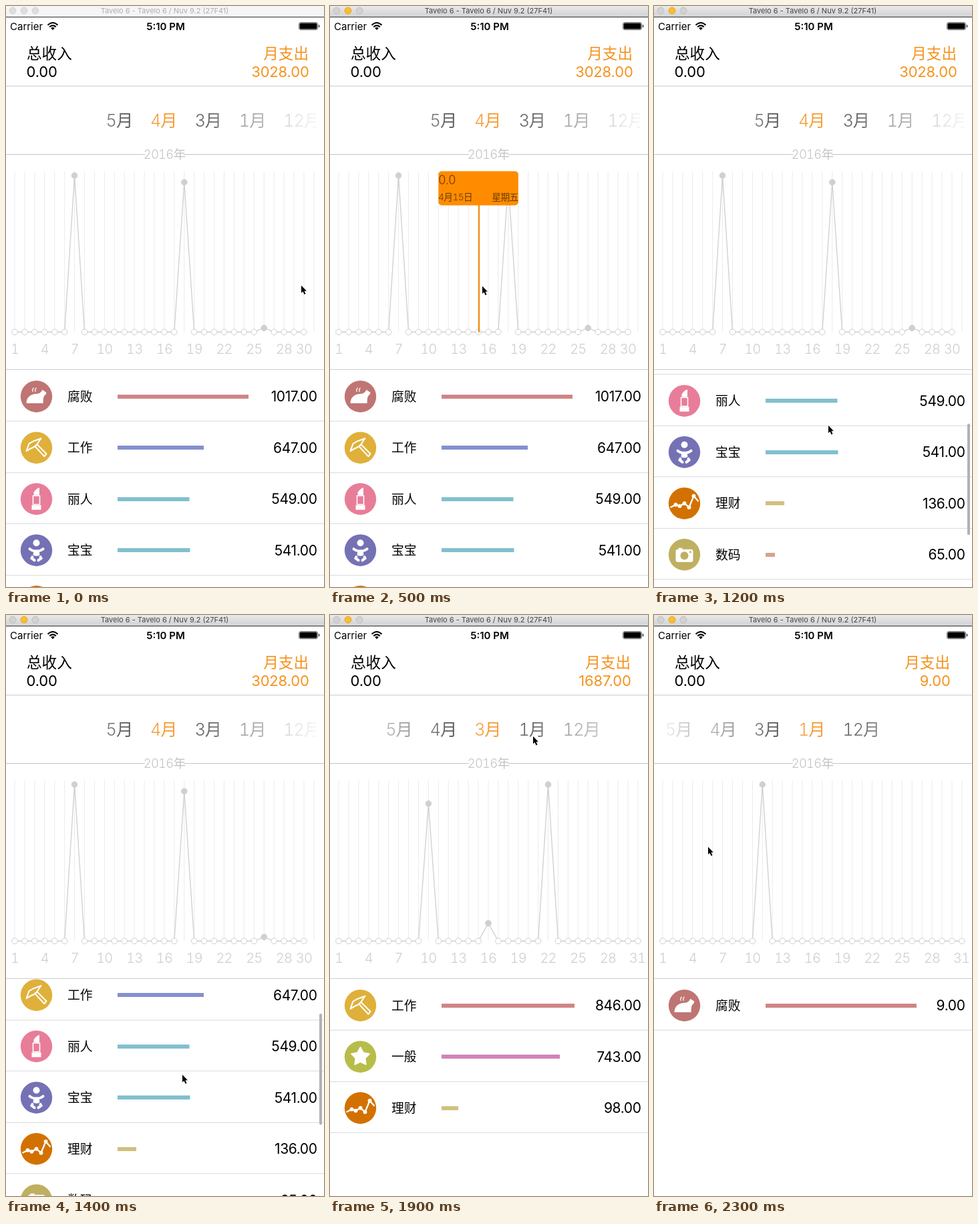
Write an HTML page that moves like this. It is 476 px wide and 867 px high and loops after 2.4 s.

```html
<!DOCTYPE html>
<html lang="zh-CN">
<head>
<meta charset="utf-8">
<style>
html, body { margin: 0; width: 100%; height: 100%; overflow: hidden; background: #fff; }
svg { display: block; font-family: Inter, 'Noto Sans CJK SC', 'Noto Sans CJK', sans-serif; }
.light { font-weight: 300; font-variant-numeric: tabular-nums; letter-spacing: -.04em; }
.num { letter-spacing: -.4px; }
.sum { letter-spacing: -.15px; }
</style>
</head>
<body>
<svg id="stage" width="476" height="867" viewBox="0 0 476 867"></svg>
<script>
const STEP = 100, COUNT = 24;
const BASE = 486.5, LIST_TOP = 543, ROW = 76.5, ORANGE = '#f5931e';
const TABS = ['5月', '4月', '3月', '1月', '12月'];

const CURSOR = [
  [442, 417], [428, 417], [384, 417], [339, 417], [285, 417], [228, 418],
  [160, 419], [105, 420], [63.5, 420], [72, 424], [150, 540], [252, 755],
  [261, 626], [261, 636], [264, 686], [269, 752], [273, 809], [292, 560],
  [304, 181], [304, 181], [304, 181], [304, 181], [210, 255], [81, 346]
];
const SCROLL = { 11: 18, 12: 146.5, 13: 140, 14: 92, 15: 36, 16: -11, 17: -3 };
const TAB_POS = { 18: 1.5, 19: 2, 20: 2.5, 21: 3, 22: 3, 23: 3 };

// icon colour and white glyph, drawn around the circle's centre
const KINDS = {
  腐败: ['#bf7573', '<path d="M-15 10C-15 1-8-4 0-4 4-4 7-6 9-10L12-8 15-6 14-3Q10-2 10 10Z"/>' +
    '<path d="M-5-7q-2-3 1-6M-1-7q-2-3 1-6" fill="none" stroke="#fff" stroke-width="1.3"/>'],
  工作: ['#dfb03a', '<g fill="none" stroke="#fff" stroke-width="2" stroke-linejoin="round">' +
    '<path d="M-15 5L-11-6-4-10 7-14Q3-9 1-5L-4-1Q-9 1-15 5Z"/><path d="M-2-2L1-5 15 9 12 13Z"/></g>'],
  丽人: ['#e87d99', '<path d="M-4-6V-10Q0-16 4.500-17V-6ZM-7 9H7V16H-7Z"/>' +
    '<path d="M-5-5H5V8H-5Z" fill="none" stroke="#fff" stroke-width="1.6"/>'],
  宝宝: ['#7571b5', '<circle cy="-11" r="5"/><path d="M-4 0H4L5 7Q0 10-5 7Z"/>' +
    '<g fill="none" stroke="#fff" stroke-width="4" stroke-linecap="round">' +
    '<path d="M-10-2Q-5 2 0 1 5 2 10-2"/><path d="M-6 10L-7 12-3 15M6 10L7 12 3 15"/></g>'],
  理财: ['#d37100', graph([[-21, 6], [-13, 2], [-7, 4], [0, 0], [7, 6], [14, -11], [21, -3]])],
  数码: ['#bfaf60', '<path d="M-9-8V-10H-3V-8H10Q13-8 13-5V8Q13 11 10 11H-10Q-13 11-13 8V-5Q-13-8-10-8Z"/>' +
    '<circle cy="1.500" r="6" fill="#bfaf60"/><circle cx="9" cy="-4" r="1.500" fill="#bfaf60"/>'],
  一般: ['#b8bd49', star(14)]
};

// rows: kind, bar width, bar colour, amount
const MONTHS = {
  april: {
    total: '3028.00', right: 453, days: 30, peaks: { 7: 253, 18: 263, 26: 480.5 },
    rows: [['腐败', 196, '#d08585', '1017.00'], ['工作', 129, '#8490cf', '647.00'],
      ['丽人', 107.5, '#82c0ce', '549.00'], ['宝宝', 108.5, '#82c0ce', '541.00'],
      ['理财', 28, '#d2c080', '136.00'], ['数码', 14, '#d2a68f', '65.00']]
  },
  march: {
    total: '1687.00', right: 450, days: 31, peaks: { 10: 281.5, 16: 460, 22: 253 },
    rows: [['工作', 199, '#d08585', '846.00'], ['一般', 177, '#d083b8', '743.00'],
      ['理财', 25, '#d2c080', '98.00']]
  },
  january: {
    total: '9.00', right: 443, days: 31, peaks: { 11: 253 },
    rows: [['腐败', 226, '#d08585', '9.00']]
  }
};
const SPENT = { 7: '1525.0', 18: '1460.0', 26: '43.0' };

function graph(pts) {
  return `<polyline points="${pts.join(' ')}" fill="none" stroke="#fff" stroke-width="2.300"/>` +
    pts.slice(1, -1).map(p => `<circle cx="${p[0]}" cy="${p[1]}" r="2.900"/>`).join('');
}

function star(r) {
  const pts = Array.from({ length: 10 }, (_, i) => {
    const a = i * Math.PI / 5, k = i % 2 ? r * .52 : r;
    return [k * Math.sin(a), -k * Math.cos(a)];
  });
  return `<polygon points="${pts.join(' ')}" stroke="#fff" stroke-width="2" stroke-linejoin="round"/>`;
}

const range = (n, fn) => Array.from({ length: n }, (_, i) => fn(i)).join('');
const dayX = d => 13 + (d - 1) * 14.93;
const rect = (x, y, w, h, fill, r = 0) =>
  `<rect x="${x}" y="${y}" width="${w}" height="${h}" fill="${fill}" rx="${r}"/>`;
const rule = (y, x = 0, w = 476, fill = '#cdcdcd') => rect(x, y, w, 1, fill);
const text = (s, x, y, size, fill = '#000', anchor = 'start', cls = '') =>
  `<text x="${x}" y="${y}" font-size="${size}" fill="${fill}" text-anchor="${anchor}" class="${cls}">${s}</text>`;

function titleBar(active) {
  const dots = range(3, i => {
    const on = active && i === 1;
    const fill = on ? '#fdbc2e' : active ? '#d2d2d2' : '#dedede';
    return `<circle cx="${10 + 17 * i}" cy="7" r="5" fill="${fill}" stroke="${on ? '#dd9f25' : active ? '#b9b9b9' : '#cfcfcf'}" stroke-width=".8"/>`;
  });
  return rect(0, 0, 476, 16, active ? 'url(#bar)' : '#f5f5f5') + rule(16, 0, 476, '#333') + dots +
    text('Tavelo 6 - Tavelo 6 / Nuv 9.2 (27F41)', 237.5, 11, 11, active ? '#444' : '#adadad', 'middle');
}

function statusBar() {
  return text('Carrier', 6, 35.5, 15) +
    '<path d="M62.500 28.500Q70 21.500 77.500 28.500M65.200 31.300Q70 27 74.800 31.300" fill="none" stroke="#000" stroke-width="2"/>' +
    '<path d="M67.200 33Q70 30.600 72.800 33L70 36Z"/>' +
    `<g font-weight="600">${text('5:10 PM', 239, 35.5, 15, '#000', 'middle')}</g>` +
    '<rect x="438.500" y="24.500" width="28" height="11" rx="2.500" fill="none" stroke="#777"/>' +
    rect(439.5, 25.5, 26, 9, '#000', 1.5) + rect(467.8, 28, 1.5, 4, '#333', .7);
}

function header(m) {
  return text('总收入', 31, 79, 22.6) + text('0.00', 30.5, 105.5, 22, '#000', 'start', 'sum') +
    text('月支出', m.right, 79, 22.6, ORANGE, 'end') +
    text(m.total, m.right + .7, 105.5, 22, ORANGE, 'end', 'sum') + rule(119);
}

function tabs(pos) {
  const on = Math.round(pos);
  return '<g mask="url(#fade)">' + TABS.map((s, i) =>
    text(s, 216 + 66.4 * (i - pos), 180, 25.3, i === on ? '#f59c35' : '#404040', 'start', 'light')).join('') + '</g>' +
    rule(221, 0, 208, '#c4c4c4') + rule(221, 266, 210, '#c4c4c4') +
    text('2016年', 237, 227.5, 18.5, '#c4c4c4', 'middle', 'light');
}

function chart(m) {
  const y = d => m.peaks[d] || BASE;
  const grid = range(31, i => rect(dayX(i + 1) - .5, 247, 1, 239, '#ebebeb'));
  const line = range(m.days, i => `${dayX(i + 1)},${y(i + 1)} `);
  const dots = range(m.days, i => {
    const d = i + 1;
    return `<circle cx="${dayX(d)}" cy="${y(d)}" r="4.300" fill="${m.peaks[d] ? '#d0d0d0' : '#fff'}"/>`;
  });
  const labels = [1, 4, 7, 10, 13, 16, 19, 22, 25, 28, m.days].map(d =>
    text(d, dayX(d) - (d > 30 ? 1 : 0), 519.3, 20, '#cecece', 'middle', 'light')).join('');
  return grid + `<polyline points="${line}" fill="none" stroke="#cfcfcf" stroke-width="1.300"/>` +
    `<g stroke="#cfcfcf" stroke-width="1">${dots}</g>` + labels;
}

function popover(cx) {
  const day = Math.round((cx - 13) / 14.93) + 1, x = dayX(day), ink = '#6b3b00';
  const week = '日一二三四五六'[new Date(2016, 3, day).getDay()];
  return rect(x - .3, 290, 2.5, 197, '#f0921e') + rect(x - 59.7, 246.5, 119.5, 51, '#ff8c00', 5) +
    text(SPENT[day] || '0.0', x - 60, 266, 18, ink, 'start', 'light') +
    text(`4月${day}日`, x - 60, 290, 13.7, ink, 'start', 'light') +
    text('星期' + week, x + 59.7, 290, 13.7, ink, 'end', 'light');
}

function list(m, off, bar) {
  const rows = m.rows.map(([kind, w, color, sum], i) => {
    const y = 582.7 + ROW * i - off, [bg, glyph] = KINDS[kind];
    return `<g transform="translate(45.500 ${y})" fill="#fff"><circle r="23.700" fill="${bg}"/>${glyph}</g>` +
      text(kind, 92, y + 6.8, 18.8) + rect(167, Math.round(y) - 3, w, 6, color) +
      text(sum, 465.5, y + 7.5, 21, '#000', 'end', 'num') +
      rule(Math.round(y + 36.4), 0, 476, '#dcdcdc');
  }).join('');
  const top = 547 + Math.max(off, 0) * .52;
  const thumb = bar ? rect(469, top, 4, 166 + Math.min(off, 0), '#b2b2b2', 2) : '';
  return `<g clip-path="url(#list)">${rows}${thumb}</g>` + rule(LIST_TOP - 1);
}

function cursor([x, y]) {
  return `<path transform="translate(${x} ${y}) scale(.9)" d="M0 0V12.500L2.800 10 5 15 7.200 14 5 9.200H8.800Z" stroke="#fff" stroke-width="1" paint-order="stroke"/>`;
}

const stops = [[0, .05], [.06, .22], [.24, .5], [.36, .82], [.5, 1], [.64, .78], [.76, .5], [.92, .18], [1, .05]];
const defs = '<defs>' +
  '<linearGradient id="bar" x2="0" y2="1"><stop stop-color="#e9e9e9"/><stop offset="1" stop-color="#d2d2d2"/></linearGradient>' +
  '<linearGradient id="ramp">' +
  stops.map(([o, a]) => `<stop offset="${o}" stop-color="#fff" stop-opacity="${a}"/>`).join('') + '</linearGradient>' +
  '<mask id="fade" maskUnits="userSpaceOnUse" x="0" y="140" width="476" height="60" style="mask-type:alpha">' +
  rect(12, 140, 452, 60, 'url(#ramp)') + '</mask>' +
  `<clipPath id="list"><rect y="${LIST_TOP}" width="476" height="324"/></clipPath></defs>`;

function draw(k) {
  const m = k < 19 ? MONTHS.april : k < 21 ? MONTHS.march : MONTHS.january;
  return defs + titleBar(k > 0) + statusBar() + header(m) + tabs(TAB_POS[k] || 1) + chart(m) +
    (k > 0 && k < 10 ? popover(CURSOR[k][0]) : '') +
    list(m, SCROLL[k] || 0, k in SCROLL) + cursor(CURSOR[k]);
}

const stage = document.getElementById('stage');
const start = performance.now();
let shown = -1;
function tick() {
  const k = Math.floor((performance.now() - start) / STEP) % COUNT;
  if (k !== shown) stage.innerHTML = draw(shown = k);
  requestAnimationFrame(tick);
}
tick();
</script>
</body>
</html>
```
